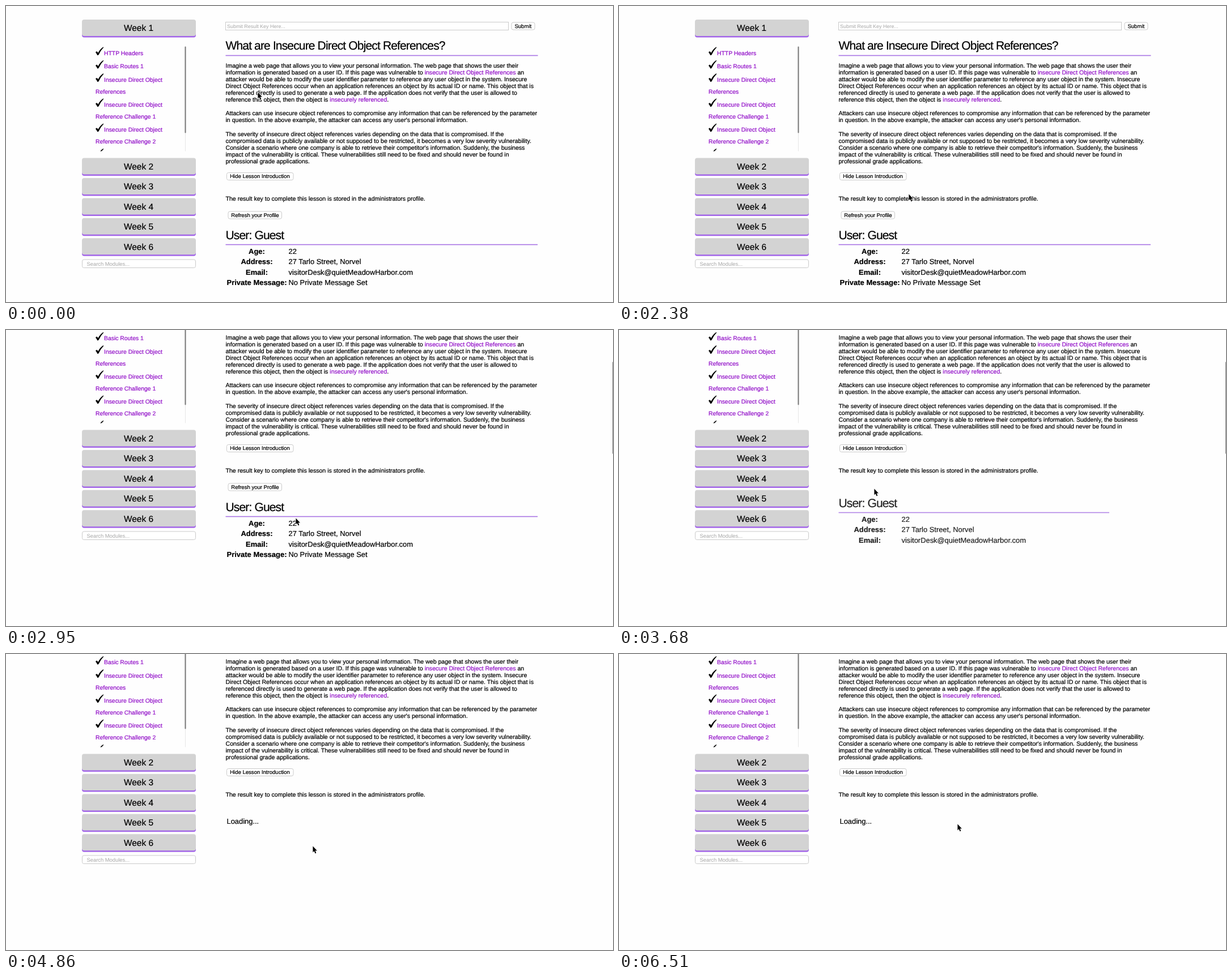
An HTML page for the animation above (8 s loop, 1071 by 523 pixels).

```html
<!DOCTYPE html>
<html lang="en">
<head>
<meta charset="utf-8">
<title>Lesson page</title>
<style>
  html, body { margin: 0; width: 1071px; height: 523px; overflow: hidden; background: #fefefe; }
  body { position: relative; }
  svg { display: block; }
  text {
    font-family: "Liberation Sans", Arial, sans-serif; text-rendering: geometricPrecision; white-space: pre;
    color: #000; fill: currentColor; stroke: currentColor; stroke-width: .22px;
  }

  #page, #fold, #loading, #thumb, #cursor { position: absolute; animation: 8s step-end infinite; }
  #page { left: 0; top: 0; width: 1071px; height: 620px; animation-name: scroll; }
  #fold { left: 387px; top: 386px; width: 551px; height: 112px; overflow: hidden; animation-name: fold; }
  #loading { left: 387px; top: 378px; width: 100px; height: 18px; overflow: hidden; animation-name: loading; }
  #thumb { right: 0; top: 48px; width: 1.5px; height: 162px; background: #808080; animation-name: thumb; }
  #cursor { left: 0; top: 0; overflow: visible; animation-name: cursor; }
  #refresh { animation: refresh 8s step-end infinite; }

  .body { font-size: 10.57px; }
  .title { font-size: 21px; letter-spacing: -.85px; }
  .week { font-size: 15.4px; text-anchor: middle; }
  .list { font-size: 10.4px; }
  .list text, .link { color: #9210c8; fill: currentColor; stroke: currentColor; }
  .btn { font-size: 9.55px; text-anchor: middle; }
  .hint { font-size: 8.95px; color: #a6a6a6; stroke: none; }
  .val { font-size: 12.9px; }
  .key { font-size: 12.97px; font-weight: bold; text-anchor: middle; }
  .box { fill: #fff; stroke: #cacaca; }
  .rule { fill: #a874e4; }

  @keyframes scroll {
    0% { transform: translateY(0); }
    35% { transform: translateY(-65px); }
    36.875%, 100% { transform: translateY(-92px); }
  }
  @keyframes thumb {
    0% { opacity: 0; transform: none; }
    35% { opacity: 1; transform: none; }
    36.875% { opacity: 1; transform: translateY(8.5px); }
    49.75% { opacity: .5; transform: translateY(8.5px); }
    51.5%, 100% { opacity: 0; transform: translateY(8.5px); }
  }
  @keyframes refresh {
    0% { opacity: 1; }
    46%, 100% { opacity: 0; }
  }
  @keyframes fold {
    0% { transform: none; width: 551px; height: 112px; opacity: 1; }
    46% { transform: translateY(-7px); width: 478px; height: 97px; opacity: .87; }
    47.875% { transform: translateY(9px); width: 286px; height: 58px; opacity: .52; }
    49.75% { transform: translateY(26px); width: 88px; height: 18px; opacity: .16; }
    51.5%, 100% { transform: translateY(35px); width: 0; height: 0; opacity: 0; }
  }
  @keyframes loading {
    0% { height: 0; opacity: 0; }
    47.875% { height: 9px; opacity: .48; }
    49.75% { height: 15px; opacity: .84; }
    51.5%, 100% { height: 18px; opacity: 1; }
  }
  @keyframes cursor {
    0% { transform: translate(444px, 152px); }
    1.875% { transform: translate(446px, 191px); }
    5.625% { transform: translate(449px, 212px); }
    7.5% { transform: translate(457px, 234px); }
    11.25% { transform: translate(486px, 255px); }
    13% { transform: translate(512px, 274px); }
    16.75% { transform: translate(556px, 328px); }
    18.625% { transform: translate(591px, 369px); }
    22.375% { transform: translate(582px, 355px); }
    24.25% { transform: translate(566px, 340px); }
    28% { transform: translate(538px, 343px); }
    29.75% { transform: translate(511px, 332px); }
    38.625% { transform: translate(489px, 306px); }
    40.5% { transform: translate(461px, 285px); }
    42.375% { transform: translate(450px, 280px); }
    57.125% { transform: translate(470px, 290px); }
    59% { transform: translate(514px, 319px); }
    60.75% { transform: translate(541px, 339px); }
    79.5% { transform: translate(571px, 318px); }
    81.375%, 100% { transform: translate(597px, 300px); }
  }
</style>
</head>
<body>
<div id="page">
  <svg width="1071" height="620">
    <defs>
      <g id="bar">
        <rect y="15" width="201" height="16.5" rx="4" fill="#a265e8"/>
        <rect width="201" height="29" rx="4" fill="#d3d3d3"/>
      </g>
      <path id="tick" d="M0 9.2 Q1.6 7.4 2.8 8 Q3.8 8.8 4.3 10.4 Q8 3.6 13.4 0 L14.4 .6 Q9 6 5.6 13.6 Q4.4 15 3.2 14.4 Q1.8 11.4 0 9.2Z"/>
      <clipPath id="pane"><rect x="150" y="66" width="160" height="190.5"/></clipPath>
    </defs>

    <!-- sidebar -->
    <use href="#bar" x="134" y="24"/>
    <use href="#bar" x="134" y="268.5"/>
    <use href="#bar" x="134" y="304"/>
    <use href="#bar" x="134" y="339.4"/>
    <use href="#bar" x="134" y="374.8"/>
    <use href="#bar" x="134" y="410.2"/>
    <g class="week">
      <text x="234" y="44.3">Week 1</text>
      <text x="234" y="288.8">Week 2</text>
      <text x="234" y="324.3">Week 3</text>
      <text x="234" y="359.7">Week 4</text>
      <text x="234" y="395.1">Week 5</text>
      <text x="234" y="430.5">Week 6</text>
    </g>
    <g clip-path="url(#pane)">
      <use href="#tick" x="158" y="72.5"/>
      <use href="#tick" x="158" y="96"/>
      <use href="#tick" x="158" y="119.3"/>
      <use href="#tick" x="158" y="163.5"/>
      <use href="#tick" x="158" y="207.7"/>
      <use href="#tick" x="158" y="251.9"/>
    </g>
    <g class="list">
      <text x="173" y="87">HTTP Headers</text>
      <text x="173" y="110.3">Basic Routes 1</text>
      <text x="173" y="133.7">Insecure Direct Object</text>
      <text x="158" y="154.7">References</text>
      <text x="173" y="178">Insecure Direct Object</text>
      <text x="158" y="199">Reference Challenge 1</text>
      <text x="173" y="222.2">Insecure Direct Object</text>
      <text x="158" y="243.2">Reference Challenge 2</text>
    </g>
    <rect x="316" y="72" width="1" height="184.5" fill="#e6e6e6"/>
    <rect x="315.5" y="71.5" width="2" height="153" rx="1" fill="#767676"/>
    <rect class="box" x="134.5" y="448" width="200" height="14.5" rx="3"/>
    <text class="hint" x="142.5" y="458.8" style="font-size:9.4px">Search Modules...</text>

    <!-- key form -->
    <rect class="box" x="387.5" y="28.5" width="499" height="14"/>
    <text class="hint" x="390" y="38.9">Submit Result Key Here...</text>
    <rect class="box" x="892" y="29" width="41" height="13" rx="3"/>
    <text class="btn" x="912.3" y="39">Submit</text>

    <!-- lesson -->
    <text class="title" x="387.5" y="77.3">What are Insecure Direct Object References?</text>
    <rect class="rule" x="387.5" y="86.7" width="551" height="1.6"/>
    <text class="body" y="96.5"><tspan x="387.5" dy="12.1">Imagine a web page that allows you to view your personal information. The web page that shows the user their</tspan><tspan x="387.5" dy="12.1">information is generated based on a user ID. If this page was vulnerable to <tspan class="link">insecure Direct Object References</tspan> an</tspan><tspan x="387.5" dy="12.1">attacker would be able to modify the user identifier parameter to reference any user object in the system. Insecure</tspan><tspan x="387.5" dy="12.1">Direct Object References occur when an application references an object by its actual ID or name. This object that is</tspan><tspan x="387.5" dy="12.1">referenced directly is used to generate a web page. If the application does not verify that the user is allowed to</tspan><tspan x="387.5" dy="12.1">reference this object, then the object is <tspan class="link">insecurely referenced</tspan>.</tspan><tspan x="387.5" dy="24.2">Attackers can use insecure object references to compromise any information that can be referenced by the parameter</tspan><tspan x="387.5" dy="12.1">in question. In the above example, the attacker can access any user's personal information.</tspan><tspan x="387.5" dy="24.2">The severity of insecure direct object references varies depending on the data that is compromised. If the</tspan><tspan x="387.5" dy="12.1">compromised data is publicly available or not supposed to be restricted, it becomes a very low severity vulnerability.</tspan><tspan x="387.5" dy="12.1">Consider a scenario where one company is able to retrieve their competitor's information. Suddenly, the business</tspan><tspan x="387.5" dy="12.1">impact of the vulnerability is critical. These vulnerabilities still need to be fixed and should never be found in</tspan><tspan x="387.5" dy="12.1">professional grade applications.</tspan></text>
    <rect class="box" x="389.5" y="294.5" width="117.5" height="13" rx="3"/>
    <text class="btn" x="448" y="304.4">Hide Lesson Introduction</text>
    <text class="body" x="387.5" y="343.6">The result key to complete this lesson is stored in the administrators profile.</text>
    <g id="refresh">
      <rect class="box" x="392" y="363" width="94.5" height="13" rx="3"/>
      <text class="btn" x="439.5" y="372.9">Refresh your Profile</text>
    </g>
  </svg>

  <div id="loading">
    <svg width="100" height="18" viewBox="387 378 100 18">
      <text class="val" x="389.5" y="391.5">Loading...</text>
    </svg>
  </div>

  <div id="fold">
    <svg width="551" height="112" viewBox="387 386 551 112">
      <text class="title" x="387.5" y="411.5">User: Guest</text>
      <rect class="rule" x="387.5" y="420.8" width="551" height="1.6"/>
      <g class="key">
        <text x="442.5" y="437.8">Age:</text>
        <text x="442.5" y="456.3">Address:</text>
        <text x="442.5" y="474.8">Email:</text>
        <text x="442.5" y="493.3">Private Message:</text>
      </g>
      <g class="val">
        <text x="498.5" y="437.8">22</text>
        <text x="498.5" y="456.3">27 Tarlo Street, Norvel</text>
        <text x="498.5" y="474.8">visitorDesk@quietMeadowHarbor.com</text>
        <text x="498.5" y="493.3">No Private Message Set</text>
      </g>
    </svg>
  </div>
</div>

<div id="thumb"></div>
<svg id="cursor" width="12" height="16">
  <path d="M.4 .6V11.4L2.8 9.2L4.5 13.4L6.3 12.6L4.6 8.6H7.9Z" stroke="#fff" stroke-width="1.6" stroke-linejoin="round" paint-order="stroke"/>
</svg>
</body>
</html>
```
